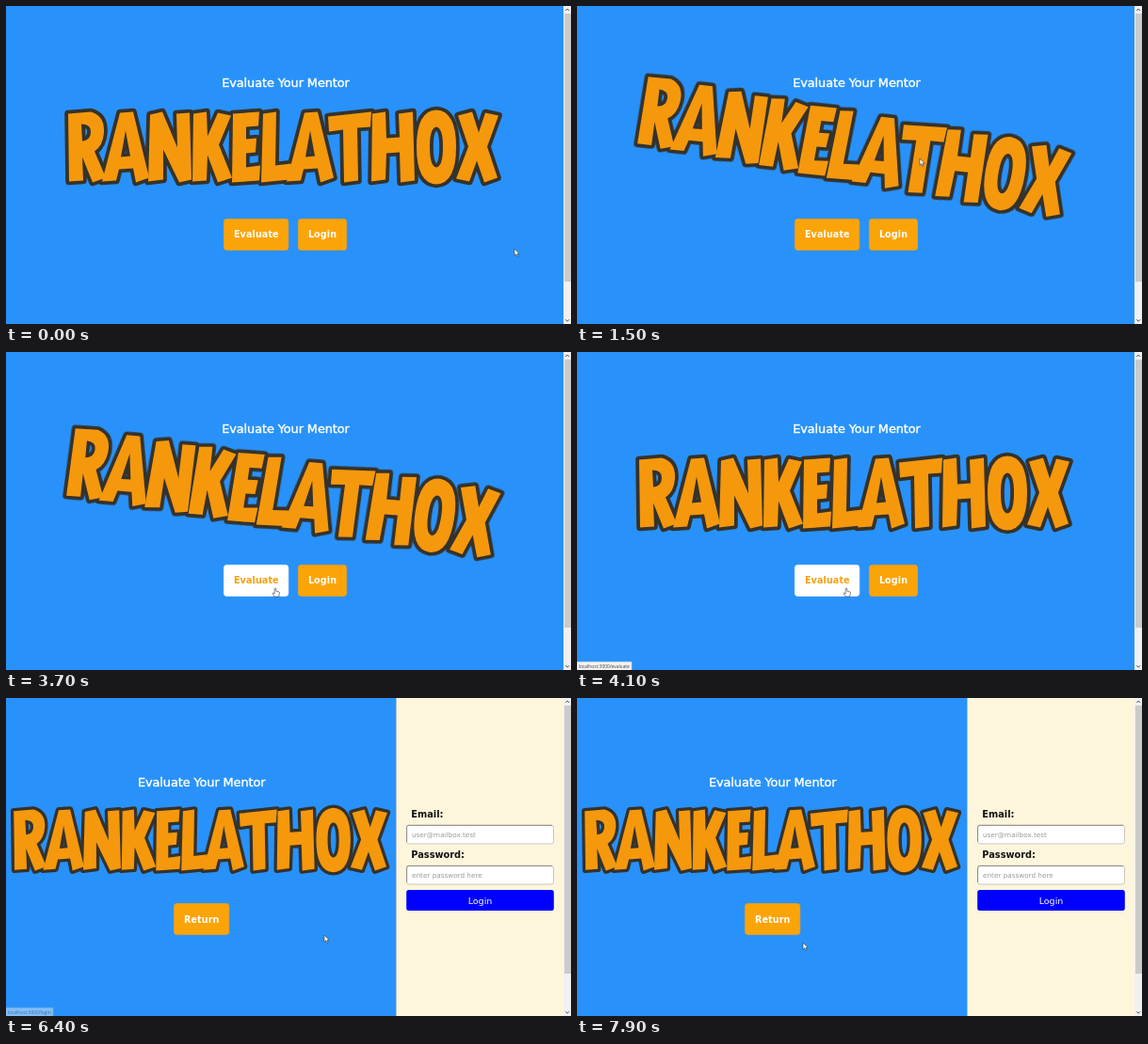
Write an HTML page that moves like this. It is 600x338 px and loops after 8000 ms.

```html
<!DOCTYPE html>
<html lang="en">
<head>
<meta charset="utf-8">
<style>
html, body { margin: 0; width: 100%; height: 100%; overflow: hidden; background: #2892fa; }
svg { display: block; width: 600px; height: 338px; }
text { font-family: "DejaVu Sans", sans-serif; }
.tag { font-size: 12.9px; letter-spacing: -.1px; fill: #fff; stroke: #fff; stroke-width: .4; text-anchor: middle; }
.btn rect { fill: #fba408; stroke: #ee9f1c; stroke-width: .8; }
.btn text { font-size: 9.6px; letter-spacing: .1px; font-weight: 700; fill: #fff; text-anchor: middle; }
.btn.on rect { fill: #fff; stroke: #f4f4f4; }
.btn.on text { fill: #f7a010; }
.label { font-size: 9.8px; font-weight: 700; fill: #111; }
.hint { font-size: 7.25px; fill: #9a9a9a; }
.small { font-family: "Open Sans", sans-serif; font-size: 4.9px; fill: #444; }
</style>
</head>
<body>
<svg viewBox="0 0 600 338" xmlns="http://www.w3.org/2000/svg">
  <defs>
    <filter id="soft" x="-5%" y="-10%" width="110%" height="120%"><feGaussianBlur stdDeviation=".7"/></filter>
    <g id="letters"></g>
    <g id="logo" role="img" aria-label="RANKELATHOX">
      <use href="#letters" fill="#35322c" stroke="#35322c" stroke-width="7.6" stroke-linejoin="round" filter="url(#soft)"/>
      <use href="#letters" fill="#f5980c"/>
    </g>
  </defs>
  <rect width="600" height="338" fill="#2892fa"/>

  <g id="home">
    <text class="tag" x="297" y="86.2">Evaluate Your Mentor</text>
    <use id="homeLogo" href="#logo"/>
    <g class="btn" id="evaluate">
      <rect x="231.4" y="226.4" width="68.4" height="33" rx="3"/>
      <text x="265.8" y="246.2">Evaluate</text>
    </g>
    <g class="btn" id="login">
      <rect x="310.4" y="226.4" width="51.2" height="33" rx="3"/>
      <text x="336" y="246.2">Login</text>
    </g>
  </g>

  <g id="account">
    <text class="tag" x="207.7" y="94">Evaluate Your Mentor</text>
    <use id="accountLogo" href="#logo"/>
    <g class="btn">
      <rect x="178.4" y="218.6" width="58.4" height="32.8" rx="3"/>
      <text x="207.7" y="238.5">Return</text>
    </g>
    <rect x="414.5" width="178" height="338" fill="#fdf6dc"/>
    <path d="M414.5 0V338" stroke="#b9c3c4" stroke-width=".8"/>
    <text class="label" x="430.3" y="127">Email:</text>
    <text class="label" x="430.3" y="170.2">Password:</text>
    <g fill="#fff" stroke="#c4c2ba" stroke-width=".9">
      <rect x="425.5" y="135.3" width="156" height="19.6" rx="2.5"/>
      <rect x="425.5" y="178.4" width="156" height="19.6" rx="2.5"/>
    </g>
    <path d="M425.6 153V137.5Q425.6 135.3 427.6 135.3H580M425.6 196V180.6Q425.6 178.4 427.6 178.4H580" fill="none" stroke="#85837d" stroke-width=".9"/>
    <text class="hint" x="431" y="147.8">user@mailbox.test</text>
    <text class="hint" x="431" y="190.9">enter password here</text>
    <rect x="425.2" y="204" width="156.6" height="22" rx="2.5" fill="#00f"/>
    <text x="503.5" y="218.6" font-size="9.5" fill="#fff" text-anchor="middle">Login</text>
  </g>

  <g>
    <rect x="592" width="8" height="338" fill="#f1f1f1"/>
    <rect x="593" y="8" width="7" height="285" fill="#cbcbcb"/>
    <path d="M594.3 5L596.2 3L598.1 5M594.3 333.2L596.2 335.2L598.1 333.2" fill="none" stroke="#555" stroke-width="1"/>
  </g>

  <g id="status">
    <rect id="statusBox" x="-1" y="329.2" height="10" fill="#f2f2f2" stroke="#c8c8c8" stroke-width=".6"/>
    <text class="small" id="statusText" x="1.8" y="335.7"></text>
  </g>
  <g id="tip">
    <rect x="285.2" y="260.6" width="44.4" height="8.8" fill="#fff" stroke="#666" stroke-width=".7"/>
    <text class="small" x="287" y="266.8">evaluate a mentor</text>
  </g>

  <path id="arrow" d="M0 0V7.2L1.7 5.7L2.9 8.3L4 7.8L2.9 5.3H5Z" fill="#fff" stroke="#333" stroke-width=".6"/>
  <path id="hand" d="M-.8 .4Q0-.6 .8 .4V3.2L4 4Q4.6 4.3 4.4 5.4L3.6 9H-.7L-3 5.6Q-2.6 4.4-.8 6Z" fill="#fff" stroke="#333" stroke-width=".6"/>
</svg>
<script>
const LOOP = 8000, STEP = 100, TILT = 10;
const $ = id => document.getElementById(id);

const glyphs = {
  R: "M0 2L24 0Q39 4 38 22Q37 36 28 42L40 70L26 75L15 48L16 73L1 74ZM14 13L15 31Q24 30 24 21Q24 13 14 13Z",
  A: "M19 1L33 0L50 70L36 75L33 60L18 61L15 73L0 74ZM25 20L20 48L30 47Z",
  N: "M2 3L15 0L31 38L30 2L44 1L46 72L33 75L16 40L16 72L0 74Z",
  K: "M1 2L15 0L16 26L27 1L41 4L28 35L42 70L27 75L16 46L15 73L0 74Z",
  E: "M1 2L29 0L28 15L15 16L15 29L26 28L25 43L15 44L15 59L30 57L29 73L0 75Z",
  L: "M2 2L16 0L15 57L32 55L30 72L0 75Z",
  T: "M0 5L46 0L45 16L31 17L32 73L17 75L16 19L1 21Z",
  H: "M1 2L15 0L16 28L30 27L29 2L44 0L46 73L31 75L30 43L16 44L15 72L0 74Z",
  O: "M21-2Q42-1 42 37Q42 76 21 77Q0 76 0 37Q0-1 21-2ZM21 16Q14 17 14 37Q14 58 21 59Q28 58 28 37Q28 17 21 16Z",
  X: "M2 4L17 0L24 22L31 1L45 4L33 37L44 70L30 75L22 52L14 74L0 71L13 37Z"
};
const lefts = [66, 102, 151, 198, 240, 271, 298, 342, 388, 436, 478];
$("letters").innerHTML = [..."RANKELATHOX"].map((c, i) =>
  `<path fill-rule="evenodd" transform="translate(${lefts[i] - 295} -37.5)" d="${glyphs[c]}"/>`).join("");

// pointer path: time, x, y
const path = [
  [1000, 540, 258], [1200, 490, 228], [1500, 364, 162], [1800, 335, 168],
  [2100, 440, 225], [2400, 299, 184], [2800, 292, 172], [3400, 300, 190],
  [3600, 288, 246], [3700, 286, 251], [5500, 286, 251], [5800, 334, 250],
  [6400, 338, 252], [6700, 440, 180], [7000, 474, 108], [7300, 470, 112],
  [7500, 330, 160], [7700, 256, 215], [7900, 240, 260]
];

const smooth = u => { u = Math.min(1, Math.max(0, u)); return u * u * (3 - 2 * u); };
const ramp = (t, from, len) => smooth((t - from) / len);
const show = (id, on) => { $(id).style.display = on ? "" : "none"; };

function pointer(t) {
  const n = path.findIndex(p => p[0] > t);
  if (n === 0) return path[0].slice(1);
  if (n < 0) return path[path.length - 1].slice(1);
  const [t0, x0, y0] = path[n - 1], [t1, x1, y1] = path[n];
  const u = smooth((t - t0) / (t1 - t0));
  return [x0 + (x1 - x0) * u, y0 + (y1 - y0) * u];
}

function setStatus(page, width, opacity) {
  $("statusText").textContent = "localhost:3000/" + page;
  $("statusBox").setAttribute("width", width);
  $("status").style.opacity = opacity;
}

function draw(t) {
  const home = t < 6400;
  const [x, y] = pointer(t);
  const over = (a, b) => home && x > a && x < b && y > 226 && y < 260;
  const onEval = over(231, 300), onLogin = over(310, 362);

  show("home", home);
  show("account", !home);
  $("evaluate").classList.toggle("on", onEval);
  $("login").classList.toggle("on", onLogin);

  const a = TILT * (ramp(t, 1100, 400) - ramp(t, 3600, 400));
  const b = TILT * (ramp(t, 7300, 300) - ramp(t, 7600, 300));
  $("homeLogo").setAttribute("transform", `translate(295 150) rotate(${a})`);
  $("accountLogo").setAttribute("transform", `translate(207 151) rotate(${b}) scale(.868)`);

  if (t < 5700) setStatus("evaluate", 59, t < 3800 ? 0 : t < 3900 ? .5 : 1);
  else setStatus("login", 51, home ? 1 : t < 6500 ? .45 : 0);
  show("tip", t >= 4300 && t < 5600);

  const hand = onEval || onLogin;
  show("hand", hand);
  show("arrow", !hand);
  $(hand ? "hand" : "arrow").setAttribute("transform", `translate(${x} ${y})`);
}

const start = performance.now();
function tick() {
  const t = (performance.now() - start) % LOOP;
  draw(Math.floor(t / STEP) * STEP);
  requestAnimationFrame(tick);
}
tick();
</script>
</body>
</html>
```
